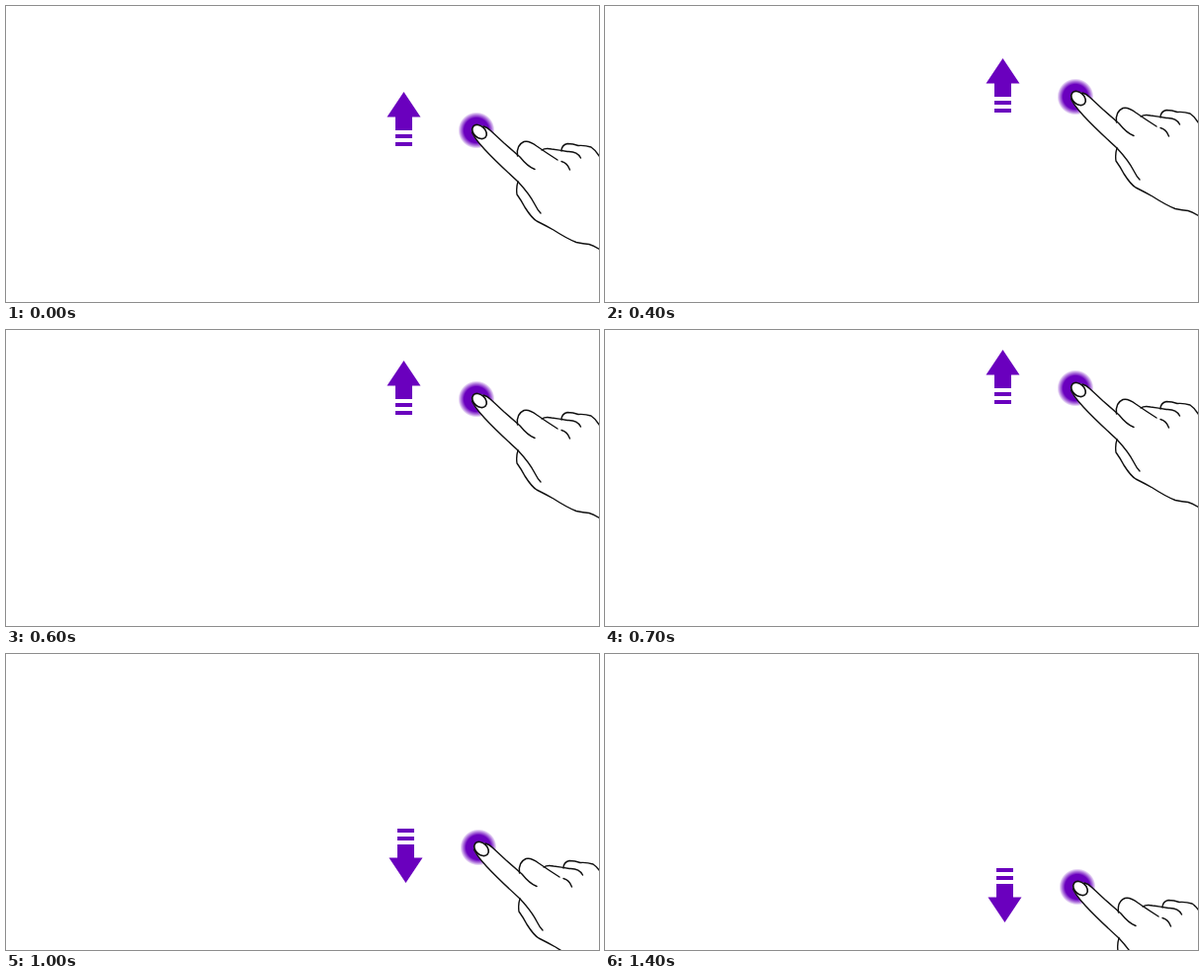
These frames come from a looping animation (600 by 300 pixels, 1.6 s). An HTML page:

```html
<!DOCTYPE html>
<html>
<head>
<meta charset="utf-8">
<style>
html, body { margin: 0; width: 100%; height: 100%; overflow: hidden; background: #fff; }
svg { display: block; }
.line { fill: none; stroke: #111; stroke-width: 1.4; stroke-linecap: round; stroke-linejoin: round; }
</style>
</head>
<body>
<svg width="600" height="300" viewBox="0 0 600 300">
  <defs>
    <radialGradient id="glow">
      <stop offset=".68" stop-color="#6a00be"/>
      <stop offset=".85" stop-color="#6a00be" stop-opacity=".5"/>
      <stop offset="1" stop-color="#6a00be" stop-opacity="0"/>
    </radialGradient>
  </defs>
  <path id="arrow" fill="#6a00be" d="M402.5 87L419.5 112.5H411V126H394V112.5H385.5ZM394 130h17v4h-17ZM394 138h17v4h-17Z"/>
  <g id="hand">
    <circle cx="476" cy="126" r="18.5" fill="url(#glow)"/>
    <path fill="#fff" d="M471 126Q471 121 477 121Q483 121 487 124L517 151Q517 138 525 137Q533 137 545 146L562 147Q563 139 572 139.5L590 142Q597 146 604 157V249Q594 242 577 240Q562 234 554 228L536 218Q529 210 517 190L518 178Q493 156 473 132Z"/>
    <g class="line">
      <path d="M483 122Q487 123 490 126L504 139L520 153Q528 163 535 165.500"/>
      <path d="M471.500 128Q474 134 484 145Q495 157 518 178Q530 191 535 201Q538 207 541 210"/>
      <path d="M518 178Q516 184 517 191Q522 198 525 204Q532 215 537 218Q546 222.500 554 227Q567 235.500 577 239.500Q584 241 590 241.500Q595 243 603 248"/>
      <path d="M517.500 152Q516 141 524 137.500Q529 136 537 142Q547 149 558 156"/>
      <path d="M562 157.500Q568 159 570.500 166"/>
      <path d="M542 146Q546 143.500 552 145Q560 146 568 147.500Q578 147 581.500 154"/>
      <path d="M562 147Q562 141 568 139.500Q574 139.500 579 141.500Q586 141 592 143Q598 147 603 157"/>
      <ellipse cx="479" cy="127.500" rx="8.300" ry="5.800" transform="rotate(42 479 127.500)" fill="#fff" stroke-width="1.700"/>
    </g>
  </g>
</svg>
<script>
const arrow = document.getElementById('arrow');
const hand = document.getElementById('hand');

function draw(ms) {
  const step = Math.max(0, Math.floor(ms / 100) - 1);
  const down = step >= 7;
  const x = down ? 2 : 0;
  const y = down ? 50 + 10 * (step - 7) : -Math.round(67 * step / 6);
  hand.setAttribute('transform', `translate(${x} ${y})`);
  arrow.setAttribute('transform', down ? `translate(2 ${249 + y}) scale(1 -1)` : `translate(0 ${y})`);
}

const start = performance.now();
function tick() {
  // The last picture is held for two steps.
  draw(Math.min((performance.now() - start) % 1600, 1499));
  requestAnimationFrame(tick);
}
tick();
</script>
</body>
</html>
```
